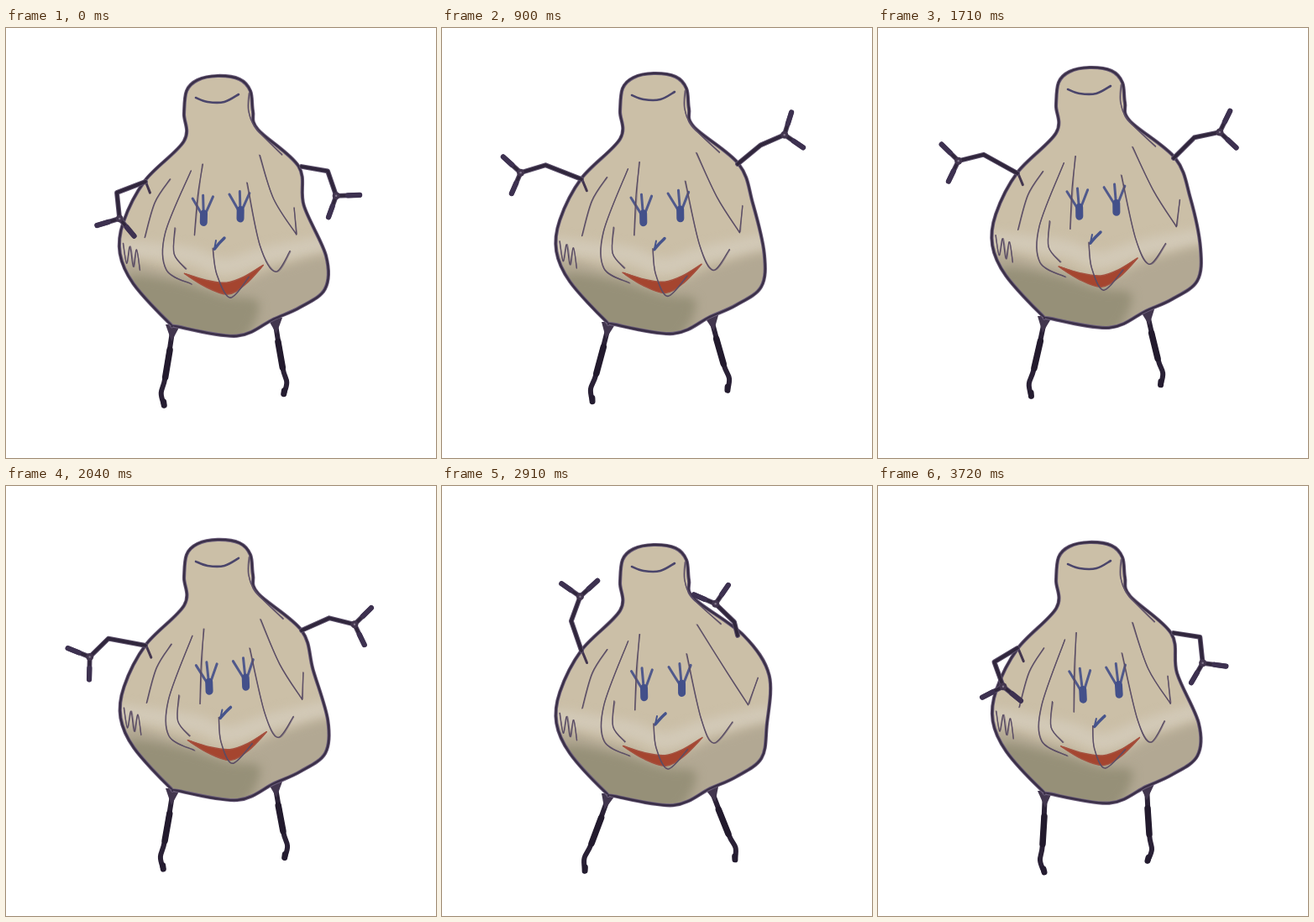
Recreate the animation shown at these times as an HTML page with a canvas. Size 512 px wide and 512 px high, loop 3.75 s.

```html
<!DOCTYPE html>
<html>
<head>
<meta charset="utf-8">
<style>
html, body { margin: 0; height: 100%; overflow: hidden; background: #fff; }
canvas { display: block; width: 100vw; height: 100vh; }
</style>
</head>
<body>
<canvas id="stage" width="512" height="512"></canvas>
<script>
const ctx = document.getElementById('stage').getContext('2d');
const { PI, sin, cos, exp } = Math;
const LOOP = 3750, STEP = 30, BEAT = 468, DEG = PI / 180;

// Arm angles are in degrees: 0 points outward, positive points down.
// time, lift, face x, face y, left upper, left fore, right upper, right fore, leg spread
const KEYS = [
  [0, -3, -3, -5, 21, 96, 10, 71, 10],
  [570, 0, 0, 0, -8, 43, -38, 9, 11],
  [1230, 0, 4, -3, -35, -9, -41, -56, 28],
  [1710, 1, 2, -2, -29, 14, -45, -12, 16],
  [2370, -4, 7, 5, 8, 75, -3, 40, 6],
  [2910, 0, 3, 3, -71, -110, -104, -136, 29],
  [3720, 11, 7, 9, 31, 110, 9, 84, 0]
];

// Key points of the body at its lowest bounce
const OUTLINE = [[212,148], [212,115], [215,88], [228,75], [252,70], [278,74], [291,88],
  [294,112], [300,134], [352,178], [366,225], [383,285], [380,324], [350,346], [319,360],
  [275,380], [205,369], [194,364], [152,318], [136,282], [140,245], [166,195]];
const FOLDS = [
  [[290,90], [289,112], [298,133], [330,164]],
  [[196,194], [178,222], [166,264]],
  [[221,184], [191,260], [192,303], [222,320]],
  [[235,176], [230,215], [227,264]],
  [[203,254], [202,285], [216,303]],
  [[289,199], [305,275], [322,305], [341,280]],
  [[303,165], [325,218], [352,260]],
  [[352,260], [354,228]],
  [[249,280], [253,310], [268,336], [291,312]],
  Array.from({ length: 6 }, (_, i) => [140 + 4 * i, 270 + 2 * i + i % 2 * 22])
];
const CAP = [[226,96], [240,101], [260,101], [277,92]];
const EYES = [[238,243], [282,238]];
const LASH_ANGLES = [-.53, -.06, .38];
const MOUTH_TOP = [[214,308], [240,316], [264,319], [285,312], [308,298]];
const MOUTH_LOW = [[308,298], [287,320], [265,332], [238,323], [214,308]];
const GLOW = [[140,276], [220,287], [262,301], [310,287], [378,272]];
const SHADE = [[125,290], [215,310], [262,324], [330,298], [395,286], [395,345], [270,400], [140,350]];
const DEEP = [[145,310], [205,317], [262,334], [302,342], [275,390], [200,385], [150,350]];

// Two slightly shaky copies of each fold look like pencil
let seed = 7;
const jitter = () => ((seed = seed * 16807 % 2147483647) / 2147483647 - .5) * 2.2;
const PENCIL = FOLDS.flatMap(f => [f, f.map(([x, y]) => [x + jitter(), y + jitter()])]);

function poseAt(t) {
  const i = Math.max(0, KEYS.findLastIndex(k => k[0] < t));
  const a = KEYS[i], b = KEYS[Math.min(i + 1, KEYS.length - 1)];
  const u = Math.min(1, (t - a[0]) / (b[0] - a[0] || 1));
  const [, lift, faceX, faceY, upL, foreL, upR, foreR, spread] =
    a.map((v, j) => v + (b[j] - v) * (1 - cos(PI * u)) / 2);
  const drop = 12.5 * (cos(2 * PI * (t - 570) / BEAT) - 1) + lift;
  return { drop, faceX, faceY, upL, foreL, upR, foreR, spread };
}

const bell = (x, y, cx, cy, rx, ry) => exp(-(((x - cx) / rx) ** 2) - ((y - cy) / ry) ** 2);

// Moves the face, and swells the right flank as the right arm rises
function warper({ drop, faceX, faceY, upR }) {
  const bulge = -.3 * upR - 8;
  return ([x, y]) => {
    const face = bell(x, y, 255, 265, 80, 70);
    return [x + face * faceX + bulge * bell(x, y, 366, 225, 50, 45), y + face * faceY + drop];
  };
}

function curve(pts, closed = false) {
  const n = pts.length, path = new Path2D();
  const at = i => closed ? pts[(i + n) % n] : pts[Math.max(0, Math.min(n - 1, i))];
  path.moveTo(...pts[0]);
  for (let i = 0; i < (closed ? n : n - 1); i++) {
    const [a, b, c, d] = [at(i - 1), at(i), at(i + 1), at(i + 2)];
    path.bezierCurveTo(b[0] + (c[0] - a[0]) / 6, b[1] + (c[1] - a[1]) / 6,
      c[0] - (d[0] - b[0]) / 6, c[1] - (d[1] - b[1]) / 6, ...c);
  }
  return path;
}

function line(...pts) {
  const path = new Path2D();
  pts.forEach(p => path.lineTo(...p));
  return path;
}

function stroke(path, color, width) {
  ctx.strokeStyle = color;
  ctx.lineWidth = width;
  ctx.stroke(path);
}

function fill(path, color) {
  ctx.fillStyle = color;
  ctx.fill(path);
}

// side is -1 for the left limb, 1 for the right one
function drawArm(shoulder, side, reach, upper, fore) {
  const step = ([x, y], deg, len) => [x + side * cos(deg * DEG) * len, y + sin(deg * DEG) * len];
  const elbow = step(shoulder, upper, reach * cos(.8 * (upper + 26) * DEG));
  const wrist = step(elbow, fore, 31);
  const tips = [step(wrist, fore * .75 - 55, 28), step(wrist, fore * .8 + 53, 27)];
  const limb = line(shoulder, elbow, wrist);
  limb.addPath(line(tips[0], wrist, tips[1]));
  stroke(limb, '#5a4e69', 5.8);
  stroke(limb, '#30263c', 3.8);
  tips.forEach(tip => {
    const mid = tip.map((v, i) => (v + wrist[i]) / 2);
    stroke(line(mid, tip), '#3d3150', 6.2);
  });
  stroke(line(wrist, wrist), '#43364f', 9);
  stroke(line(wrist, wrist), '#80758a', 2.5);
}

function drawLeg([x, y], side, spread, length) {
  const turn = spread / 95;
  const at = (dx, dy) => [x + side * (dx * cos(turn) + dy * sin(turn)) ,
    y + length * (dy * cos(turn) - dx * sin(turn))];
  const [hip, knee, ankle, toe] = [at(0, 0), at(3, 60), at(6, 79), at(1, 93)];
  stroke(curve([hip, knee, ankle, toe]), '#2a2136', 6);
  stroke(line(at(1, 28), knee), '#221a2d', 7.5);
  stroke(line(at(2, 89), toe), '#241c30', 7);
  fill(line([x - 9, y - 2], [x + 9, y - 2], at(0, 18)), '#42364e');
}

function drawFace(warp) {
  const shape = pts => curve(pts.map(warp));
  const mouth = shape(MOUTH_TOP);
  mouth.addPath(shape(MOUTH_LOW));
  const lips = curve([...MOUTH_TOP, ...MOUTH_LOW.slice(1, -1)].map(warp), true);
  fill(lips, '#a5452f');
  stroke(mouth, '#a5503e', 1.5);
  EYES.forEach(([x, y]) => {
    LASH_ANGLES.forEach(a =>
      stroke(shape([[x, y], [x + 28 * sin(a), y - 28 * cos(a)]]), '#50598c', 3));
    stroke(shape([[x, y - 5], [x, y + 6]]), '#43508a', 9);
  });
  stroke(shape([[251,281], [257,274], [263,268]]), '#46548c', 3.5);
  stroke(shape([[251,281], [253,271]]), '#46548c', 2);
}

function draw(t) {
  const pose = poseAt(t), warp = warper(pose);
  const shape = (pts, closed) => curve(pts.map(warp), closed);
  const joint = (x, y) => [x, y + pose.drop];
  ctx.fillStyle = '#fff';
  ctx.fillRect(0, 0, 512, 512);
  ctx.lineCap = ctx.lineJoin = 'round';
  drawLeg(joint(199, 368), -1, pose.spread, 1.02);
  drawLeg(joint(320, 360), 1, pose.spread, .96);

  const skin = shape(OUTLINE, true);
  fill(skin, '#cbbfa7');
  ctx.save();
  ctx.clip(skin);
  ctx.filter = 'blur(6px)';
  stroke(shape(GLOW), '#d2c9b7', 20);
  fill(shape(SHADE, true), '#b2a893');
  fill(shape(DEEP, true), '#969078');
  ctx.restore();
  stroke(skin, '#6b5d7a', 4.2);
  stroke(skin, '#3a2f47', 2.4);

  drawFace(warp);
  PENCIL.forEach((f, i) => stroke(shape(f), i % 2 ? 'rgba(95,80,105,.6)' : '#554961', 1.3));
  stroke(shape(CAP), '#4a456b', 2.6);
  stroke(shape([[166,195], [172,210]]), '#43364f', 3);

  drawArm(joint(166, 196), -1, 46, pose.upL, pose.foreL);
  drawArm(joint(352, 178), 1, 36, pose.upR, pose.foreR);
}

function tick(now) {
  draw(Math.floor((now % LOOP) / STEP) * STEP);
  requestAnimationFrame(tick);
}
requestAnimationFrame(tick);
</script>
</body>
</html>
```
